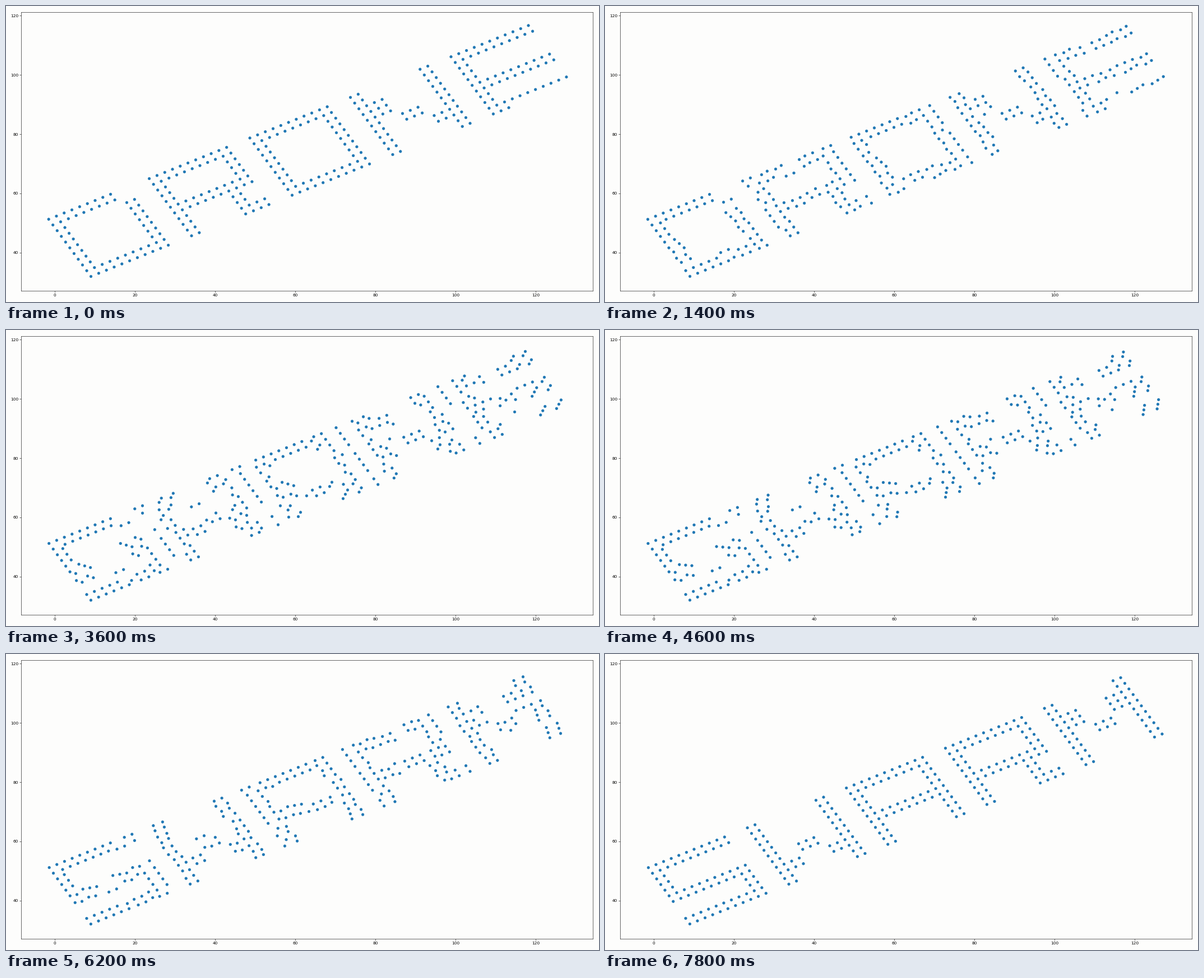
A matplotlib script for the animation above (8 s loop, 1058 by 529 pixels).

```python
import numpy as np
import matplotlib.pyplot as plt
from matplotlib.animation import FuncAnimation

FRAMES = 40
PITCH = 13  # lattice columns from one letter to the next

# Strokes as (first col, last col, first row, last row) on an 11 x 11 lattice
TOP, MID, LOW = (0, 10, 0, 1), (0, 10, 5, 6), (0, 10, 9, 10)
LEFT, RIGHT = (0, 1, 0, 10), (9, 10, 0, 10)
HUB = (4, 6, 5, 6)

GLYPHS = {
    "D": [(0, 8, 0, 1), LEFT, (9, 10, 2, 10), LOW],
    "R": [TOP, MID, LEFT, (9, 10, 0, 6), (7, 8, 7, 10), (7, 10, 9, 10)],
    "O": [TOP, LOW, LEFT, RIGHT],
    "N": [LEFT, RIGHT, (2, 3, 2, 4), HUB, (7, 8, 7, 8)],
    "E": [TOP, MID, LOW, LEFT],
    "S": [TOP, MID, LOW, (0, 1, 0, 6), (9, 10, 5, 10)],
    "W": [LEFT, RIGHT, HUB, (2, 3, 7, 8), (7, 8, 7, 8)],
    "A": [TOP, MID, LEFT, RIGHT],
    "M": [LEFT, RIGHT, (2, 3, 2, 4), (7, 8, 2, 4), HUB],
}


def word_cells(word):
    """Lattice cells (row, col) of a word, in reading order."""
    cells = set()
    for k, letter in enumerate(word):
        for c0, c1, r0, r1 in GLYPHS[letter]:
            cells |= {(r, c + PITCH * k)
                      for r in range(r0, r1 + 1) for c in range(c0, c1 + 1)}
    return np.array(sorted(cells), float)


def place(cells, origin, scale, angle):
    """Rotate and scale lattice cells into data coordinates."""
    r, c = cells.T
    cos, sin = scale * np.cos(angle), scale * np.sin(angle)
    return np.column_stack([origin[0] + c * cos + r * sin,
                            origin[1] + c * sin - r * cos])


def assign(cost):
    """Hungarian method: the column matched to each row at least total cost."""
    n = len(cost)
    u, v = np.zeros(n + 1), np.zeros(n + 1)
    owner = np.full(n + 1, -1)  # slot n holds the row being inserted
    for row in range(n):
        owner[n] = row
        j = n
        best = np.full(n, np.inf)
        prev = np.full(n, n)
        used = np.zeros(n + 1, bool)
        while owner[j] >= 0:
            used[j] = True
            i = owner[j]
            free = ~used[:n]
            reduced = cost[i] - u[i] - v[:n]
            better = free & (reduced < best)
            best[better] = reduced[better]
            prev[better] = j
            nxt = int(np.argmin(np.where(free, best, np.inf)))
            delta = best[nxt]
            u[owner[used]] += delta
            v[used] -= delta
            best[free] -= delta
            j = nxt
        while j != n:
            owner[j] = owner[prev[j]]
            j = prev[j]
    match = np.empty(n, int)
    match[owner[:n]] = np.arange(n)
    return match


goal = place(word_cells("SWARM"), (-1.36, 51.14), 2.164, 0.4983)
start = place(word_cells("DRONE")[:len(goal)], (-1.53, 51.28), 2.2, 0.5)

# Least sum of squared path lengths
gaps = start[:, None] - goal[None]
goal = goal[assign((gaps ** 2).sum(axis=2))]

W, H = 1058, 529
DPI = 52.9
PAPER = "#fdfdfc"
x0, x1, y0, y1 = 27.2, 1047.2, 508.8, 10.8  # plot box in pixels from top left

fig = plt.figure(figsize=(W / DPI, H / DPI), dpi=DPI, facecolor=PAPER)
ax = fig.add_axes([x0 / W, 1 - y0 / H, (x1 - x0) / W, (y0 - y1) / H],
                  facecolor=PAPER)
ax.set_xlim((x0 - 87.1) / 7.15, (x1 - 87.1) / 7.15)
ax.set_ylim(40 + (440.8 - y0) / 5.294, 40 + (440.8 - y1) / 5.294)
ax.set_xticks(range(0, 121, 20))
ax.set_yticks(range(40, 121, 20))
# One size per dot keeps the markers off the whole-pixel grid
dots = ax.scatter(*start.T, s=np.full(len(start), 36), color="#1f77b4")


def update(i):
    t = i / (FRAMES - 1)
    dots.set_offsets(start + (goal - start) * t)
    return (dots,)


anim = FuncAnimation(fig, update, frames=FRAMES, interval=200,
                     repeat=True, repeat_delay=0)
plt.show()
```
